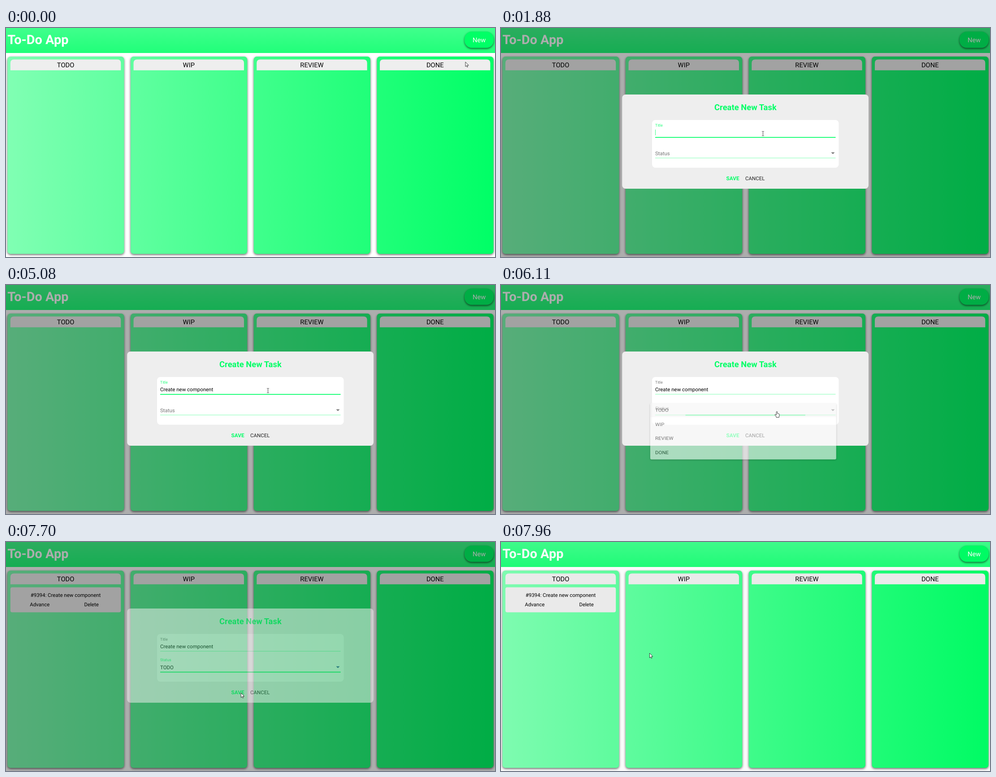
An HTML page for the animation above (8000 ms loop, 1091 px wide and 513 px high).

```html
<!DOCTYPE html>
<html lang="en">
<head>
<meta charset="utf-8">
<title>To-Do App</title>
<style>
  html, body { margin: 0; width: 100%; height: 100%; overflow: hidden; background: #fff; }
  svg { display: block; position: absolute; left: 0; top: 0; }
  text { font-family: Roboto, sans-serif; font-size: 11.48px; text-rendering: geometricPrecision; white-space: pre; }
  .head { font-size: 14.76px; }
  .col { filter: drop-shadow(0 2.4px 2.5px rgba(0, 0, 0, .6)); }
  .btn { filter: drop-shadow(0 2.4px 2px rgba(0, 0, 0, .6)); }
  .panel { filter: drop-shadow(0 2px 2px rgba(0, 0, 0, .3)); }
</style>
</head>
<body>
<svg id="stage" width="1091" height="513" viewBox="0 0 1091 513"></svg>
<script>
const LOOP = 8000, STEP = 79.4, PHASE = 60;
const GREEN = '#00ff66', FOCUS = '#20ff79', LINE = '#80ffb3', HINT = 'rgba(0,0,0,.54)', INK = 'rgba(0,0,0,.87)';
const STATES = ['TODO', 'WIP', 'REVIEW', 'DONE'];
const stage = document.getElementById('stage');

function add(parent, tag, attrs = {}, content) {
  const el = document.createElementNS('http://www.w3.org/2000/svg', tag);
  set(el, attrs);
  if (content !== undefined) el.textContent = content;
  parent.appendChild(el);
  return el;
}
function set(el, attrs) {
  for (const k in attrs) el.setAttribute(k, attrs[k]);
}
const rect = (p, x, y, width, height, fill, more) => add(p, 'rect', { x, y, width, height, fill, ...more });
const label = (p, s, x, y, more) => add(p, 'text', { x, y, ...more }, s);
const centred = (p, s, x, y, more) => label(p, s, x, y, { 'text-anchor': 'middle', ...more });
const show = (el, on) => set(el, { visibility: on ? 'visible' : 'hidden' });

// Spring green mixed with white, from pale (0) to full (4)
const tint = i => {
  const w = 128 - 32 * i;
  return `rgb(${w} 255 ${102 + w * .6})`;
};
function gradient(id, from, to, vertical) {
  const g = add(stage, 'linearGradient', { id, x2: vertical ? 0 : 1, y2: vertical ? 1 : 0 });
  add(g, 'stop', { offset: 0, 'stop-color': from });
  add(g, 'stop', { offset: 1, 'stop-color': to });
  return `url(#${id})`;
}

// Progress from 0 to 1 over a span, and the same eased out
const span = (t, start, length) => Math.min(1, Math.max(0, (t - start) / length));
const ease = (t, start, length) => 1 - (1 - span(t, start, length)) ** 3.5;

// Board
rect(stage, 0, 0, 1091, 513, '#fff');
rect(stage, 0, 0, 1091, 56, gradient('bar', tint(2), tint(3), true));
label(stage, 'To-Do App', 3.3, 36.2, { fill: '#fff', style: 'font-size:28.9px;font-weight:700' });
rect(stage, 1023, 8, 65, 36.5, GREEN, { rx: 16.4, class: 'btn' });
centred(stage, 'New', 1055.6, 32.1, { fill: '#fff', class: 'head' });
STATES.forEach((name, i) => {
  const x = 3.28 + i * 274.73;
  rect(stage, x, 64, 260.2, 442, gradient('tint' + i, tint(i), tint(i + 1)), { rx: 6.56, class: 'col' });
  add(stage, 'path', { d: `M${x + 6.56} 94.7V78.5q0-8 8-8h230.4q8 0 8 8v16.2z`, fill: '#eee' });
  centred(stage, name, x + 129.8, 88.1, { class: 'head' });
});
const card = add(stage, 'g');
rect(card, 9.84, 101.5, 246.4, 56, '#eee', { rx: 4 });
centred(card, '#9394: Create new component', 133, 122.5);
centred(card, 'Advance', 75.2, 144.4);
centred(card, 'Delete', 190.6, 144.4);
const shade = rect(stage, 0, 0, 1091, 513, '#000');

// Dialog
const dialog = add(stage, 'g');
rect(dialog, 270.3, 149, 549.7, 211, '#eee', { rx: 7.5 });
centred(dialog, 'Create New Task', 545.4, 184, { fill: GREEN, style: 'font-size:18.4px;font-weight:700' });
rect(dialog, 337, 206, 416.5, 107, '#fff', { rx: 7.5 });

function field(name, base) {
  const hint = add(dialog, 'text', {}, name);
  const value = label(dialog, '', 344, base);
  rect(dialog, 344, base + 6.2, 402.5, 1, LINE);
  const line = rect(dialog, 0, base + 6, 0, 2, FOCUS);
  return (lift, grow, focused, text) => {
    const y = base - 17.3 * lift, s = 1 - .25 * lift;
    set(hint, { transform: `translate(344 ${y}) scale(${s})`, fill: focused ? FOCUS : HINT });
    set(line, { x: 545.25 - 201.25 * grow, width: 402.5 * grow });
    value.textContent = text;
    return value;
  };
}
const titleField = field('Title', 238), statusField = field('Status', 284.5);
const caret = rect(dialog, 344, 227.5, .9, 13, FOCUS);
const arrowDown = add(dialog, 'path', { d: 'M736.4 278.5h8.2l-4.1 4.1z' });
const save = centred(dialog, 'SAVE', 517, 341.1, { fill: GREEN, style: 'font-size:11.8px;font-weight:700' });
const cancel = centred(dialog, 'CANCEL', 566.7, 341.1, { fill: INK });

// Select panel
const panel = add(stage, 'g');
const sheet = rect(panel, 333, 263.1, 425, 137.7, '#fff', { rx: 3, class: 'panel' });
const hover = rect(panel, 333, 263.1, 425, 34.4, 'rgba(0,0,0,.04)');
STATES.forEach((name, i) => label(panel, name, 344, 284.4 + i * 34.44, { fill: INK }));

// Pointers, each with its hot spot at 0,0
const outline = { fill: '#fff', stroke: '#111', 'stroke-width': .8, 'stroke-linejoin': 'round' };
const pointers = {
  arrow: add(stage, 'path', { d: 'M0 0V10.4L2.3 8.3 3.9 11.7 5.4 11 3.9 7.6H7.2Z', ...outline }),
  hand: add(stage, 'path', { d: 'M-1.2 1Q0-.6 1.2 1V4.9L4.9 5.8Q6 6.2 5.8 7.8L4.9 11.2V13.6H-1.4V12L-4.3 8.2Q-4.6 6.6-3 6.9L-1.2 8.4Z', ...outline }),
  beam: add(stage, 'path', { d: 'M-2.3-5H-.6L0-4.4 .6-5H2.3M0-4.4V4.4M-2.3 5H-.6L0 4.4 .6 5H2.3', fill: 'none', stroke: '#333', 'stroke-width': .9 })
};

// Where the pointer goes
const moves = [
  { from: 60, to: 380, x: 1036, y: 39 },
  { from: 460, to: 615, x: 861, y: 124 },
  { from: 615, to: 1330, x: 584.5, y: 236.5 },
  { from: 5460, to: 5620, x: 636, y: 287 },
  { from: 5920, to: 6090, x: 615.5, y: 283 },
  { from: 6170, to: 6640, x: 562, y: 287 },
  { from: 6800, to: 7520, x: 524.3, y: 338 },
  { from: 7765, to: 7920, x: 331.5, y: 249 }
];
function pointerAt(t) {
  let x = 1025, y = 76;
  for (const m of moves) {
    const p = span(t, m.from, m.to - m.from);
    x += (m.x - x) * p;
    y += (m.y - y) * p;
  }
  return { x, y };
}
function pointerKind({ x, y }, inDialog) {
  const over = (l, t, r, b) => x > l && x < r && y > t && y < b;
  if (!inDialog) return over(1023, 8, 1088, 45) ? 'hand' : 'arrow';
  if (over(337, 206, 753, 255)) return 'beam';
  return over(337, 255, 753, 300) || over(497, 326, 537, 348) ? 'hand' : 'arrow';
}

// Typing in bursts, one key every GAP ms
const GAP = 70, FOCUS_AT = 1400, BLUR_AT = 5940;
const keys = [];
for (const [start, text] of [[2440, 'C'], [2690, 're'], [2930, 'ate '], [3400, 'n'], [3550, 'ew'], [3800, ' '], [3970, 'compo'], [4370, 'nent']])
  [...text].forEach((char, i) => keys.push({ char, time: start + i * GAP }));

function drawTitle(t, q) {
  const focused = q >= FOCUS_AT && t < BLUR_AT;
  const typed = keys.filter(k => k.time <= t);
  const text = typed.map(k => k.char).join('');
  const value = titleField(ease(q, FOCUS_AT, 320), focused ? ease(q, FOCUS_AT, 300) : 0, focused, text);
  const since = t - (typed.length ? typed[typed.length - 1].time : FOCUS_AT);
  set(caret, { x: 344 + (text ? value.getComputedTextLength() : 0) });
  set(caret, { opacity: focused && Math.floor(since / 490) % 2 === 0 ? 1 : 0 });
}

function drawSelect(q) {
  const focused = q > 6150, chosen = q > 6720;
  statusField(ease(q, 6062, 400), ease(q, 6014, 300), focused, chosen ? 'TODO' : '');
  set(arrowDown, { fill: focused ? '#34509c' : HINT });

  const p = ease(q, 6068, 120), width = 400 + 25.5 * p;
  const opacity = p * (1 - span(q, 6735, 90));
  set(panel, { opacity, transform: `translate(0 280.3) scale(1 ${.8 + .2 * p}) translate(0 -280.3)` });
  set(sheet, { width });
  set(hover, { width });
}

function draw(t) {
  const q = Math.max(0, Math.floor((t - PHASE) / STEP) * STEP + PHASE);
  const inDialog = q > 500 && q < 7650, ready = q > 690;

  show(card, q > 7650);
  set(shade, { opacity: .32 * (ease(q, 500, 180) - ease(q, 7690, 400)) });

  const shown = ease(q, 500, 110), z = .7 + .3 * shown;
  set(dialog, {
    opacity: shown - ease(q, 7670, 75),
    transform: `translate(545.2 254.5) scale(${z}) translate(-545.2 -254.5)`
  });
  set(save, { x: ready ? 517 : 515.4 });
  set(cancel, { opacity: ready ? 1 : 0 });
  drawTitle(t, q);
  drawSelect(q);

  const pos = pointerAt(q), kind = pointerKind(pos, inDialog);
  for (const k in pointers) show(pointers[k], k === kind);
  set(pointers[kind], { transform: `translate(${pos.x} ${pos.y})` });
}

const start = performance.now();
function tick() {
  draw((performance.now() - start) % LOOP);
  requestAnimationFrame(tick);
}
tick();
</script>
</body>
</html>
```
